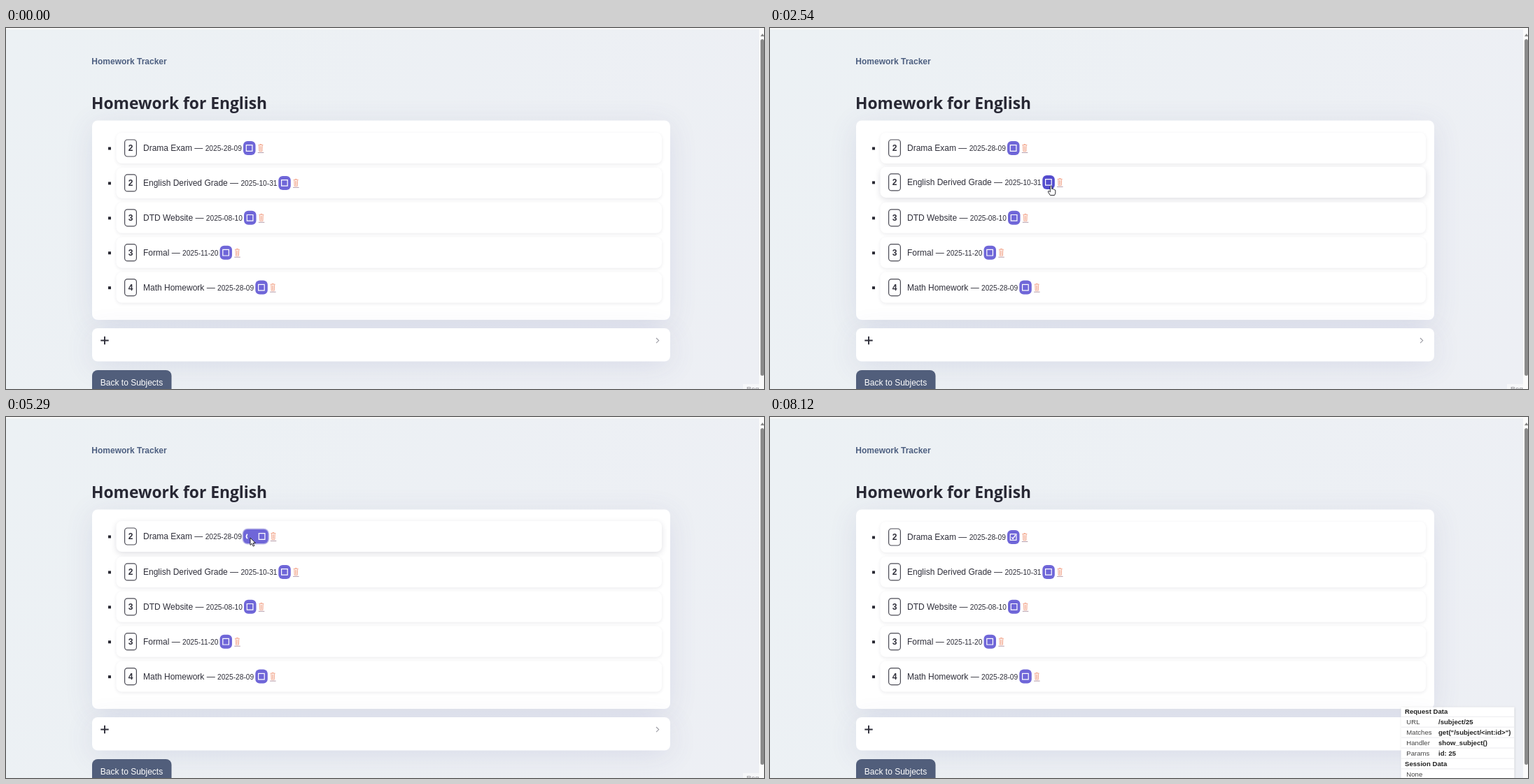
These frames come from a looping animation (1083 px wide and 517 px high, 8.32 s). An HTML page with a canvas:

```html
<!DOCTYPE html>
<html lang="en">
<head>
<meta charset="utf-8">
<title>Homework Tracker</title>
<style>
  html, body { margin: 0; width: 100%; height: 100%; overflow: hidden; background: #edf0f4; }
  canvas { display: block; }
</style>
</head>
<body>
<canvas id="stage" width="1083" height="517"></canvas>
<script>
const ctx = document.getElementById('stage').getContext('2d');
const LOOP = 8320, STEP = LOOP / 125;
const SANS = '"Liberation Sans", Arial, sans-serif';
const INK = '#2f2f3a';

// priority, title, date, left edge of the tick button
const rows = [
  [2, 'Drama Exam', '2025-28-09', 339],
  [2, 'English Derived Grade', '2025-10-31', 389.3],
  [3, 'DTD Website', '2025-08-10', 340],
  [3, 'Formal', '2025-11-20', 305.5],
  [4, 'Math Homework', '2025-28-09', 356.3]
];
const rowY = i => 172 + 49.9 * i;

// pointer tip: time, x, y
const path = [
  [390, 1005, 491], [1200, 372, 143], [1270, 372, 143], [1530, 349, 172],
  [1960, 349, 172], [2500, 401.5, 226], [2900, 401.5, 226], [3610, 351, 275],
  [3943, 351, 275], [4110, 356, 182], [4250, 356, 182], [4500, 349, 173],
  [6050, 349, 173], [6450, 401, 183], [6850, 350, 168],
  [7190, 350, 168], [8050, 1062, 520]
];

const lerp = (a, b, p) => a + (b - a) * p;
const mix = (a, b, p) => `rgb(${a.map((v, i) => Math.round(lerp(v, b[i], p)))})`;

function pointer(t) {
  const q = Math.floor(t / STEP) * STEP;
  const i = path.findIndex(k => k[0] > q);
  if (i === 0) return path[0].slice(1);
  if (i < 0) return path.at(-1).slice(1);
  const [t0, x0, y0] = path[i - 1], [t1, x1, y1] = path[i];
  const p = (q - t0) / (t1 - t0), e = p * p * (3 - 2 * p);
  return [lerp(x0, x1, e), lerp(y0, y1, e)];
}

const isBusy = t => t >= 4850 && t < 5560;
const isLive = t => t >= 390 && !(t >= 5490 && t < 5620);

function overRow(t, i) {
  const [x, y] = pointer(t);
  return isLive(t) && x > 157 && x < 937 && Math.abs(y - rowY(i)) < 22;
}

function overButton(t, i, width = 18) {
  const [x, y] = pointer(t), left = rows[i][3];
  return isLive(t) && !isBusy(t) && x >= left && x <= left + width && Math.abs(y - rowY(i)) < 11;
}

// a linear transition: share of the recent past spent in the state
function eased(test, t, i, span = 150) {
  let n = 0;
  for (let k = 0; k < 10; k++) n += test(t - k * span / 10, i);
  return n / 10;
}

function text(str, x, y, size, color = INK, weight = 400, family = SANS) {
  ctx.font = `${weight} ${size}px ${family}`;
  ctx.fillStyle = color;
  ctx.fillText(str, x, y);
  return x + ctx.measureText(str).width;
}

function box(x, y, w, h, r, fill, stroke, line = 1) {
  ctx.beginPath();
  ctx.roundRect(x, y, w, h, r);
  if (fill) { ctx.fillStyle = fill; ctx.fill(); }
  if (stroke) { ctx.strokeStyle = stroke; ctx.lineWidth = line; ctx.stroke(); }
}

function raised(dy, blur, color, draw) {
  ctx.save();
  Object.assign(ctx, { shadowOffsetY: dy, shadowBlur: blur, shadowColor: color });
  draw();
  ctx.restore();
}

function stroke(d, color, line, x = 0, y = 0) {
  ctx.save();
  ctx.translate(x, y);
  ctx.strokeStyle = color;
  ctx.lineWidth = line;
  ctx.stroke(new Path2D(d));
  ctx.restore();
}

function card(y, h) {
  raised(7, 40, 'rgba(75,75,150,.13)', () => box(123, y, 826, h, 8, '#fff'));
}

function trash(x, y, color) {
  stroke('M0 -4.5H7M2.5 -4.5V-5.5H4.5V-4.5M1 -4.5L1.4 4.5H5.6L6 -4.5M2.7 -3V3.5M4.3 -3V3.5', color, .8, x + .6, y);
  stroke('M0 6.5H8.5', '#b59ba8', 1, x, y);
}

function tickButton(t, i, y) {
  const busy = i === 0 && isBusy(t), x = rows[i][3], w = busy ? 35.5 : 17.5;
  const fill = mix([111, 102, 216], [77, 69, 202], eased(overButton, t, i, 200));
  if (busy) box(x - .5, y - 10.5, w + 1, 21, 7, null, '#b9b5e6', 2);
  box(x, y - 10, w, 20, 6, fill);
  if (busy) {
    const turn = Math.PI + (Math.min(t, 5290) - 5290) / 110;
    ctx.beginPath();
    ctx.arc(x + 8.5, y, 4, turn - .9, turn + .9);
    ctx.strokeStyle = '#fff';
    ctx.lineWidth = 1.8;
    ctx.stroke();
  }
  const left = x + w - 13.2;
  box(left, y - 4.3, 8.6, 8.6, 0, null, '#fff', 1.2);
  if (i === 0 && t >= 5560) stroke('M2 .2L3.8 2.3L7.4 -3', '#fff', 1.4, left, y);
  return x + w;
}

function trashColor(t, i) {
  if (i === 0 && t > 1400 && t < 2010) return '#77688a';
  if (i < 3 && t >= 4010 && t < 4820) return '#d58c9c';
  return '#f2a085';
}

function drawRow(t, i) {
  const [level, title, date] = rows[i], h = eased(overRow, t, i), y = rowY(i) - h;
  raised(1.5 + h, 5 + 3 * h, `rgba(40,40,70,${.09 + .06 * h})`, () => box(157.5, y - 22, 779.5, 44, 8, '#fff'));
  ctx.fillStyle = '#292933';
  ctx.fillRect(146, y - 1.5, 4, 4);
  box(169.6, y - 12, 16.8, 24, 4, '#fff', '#4b4b55', 1.2);
  text(level, 174.7, y + 4.3, 12, INK, 700);
  const end = text(title + ' — ', 196, y + 4, 12);
  text(date, end, y + 4, 10.2);
  trash(tickButton(t, i, y) + 3.3, y, trashColor(t, i));
}

function drawPage(t) {
  const bg = ctx.createLinearGradient(0, 0, 1083, 517);
  bg.addColorStop(0, '#ecf1f4');
  bg.addColorStop(1, '#edeff4');
  ctx.fillStyle = bg;
  ctx.fillRect(0, 0, 1083, 517);
  ctx.fillStyle = '#fafafa';
  ctx.fillRect(0, 0, 1083, 2);

  text('Homework Tracker', 122.3, 52.3, 12, '#4d5f80', 700);
  text('Homework for English', 122, 116, 22.8, '#272733', 700, '"Open Sans", "Noto Sans", sans-serif');
  card(132.5, 285.5);
  card(430, 47.5);
  rows.forEach((_, i) => drawRow(t, i));

  stroke('M135.3 447.5H146.7M141 441.8V453.2', INK, 1.9);
  stroke('M929 444L932.7 447.6L929 451.2', '#9a9aa2', 1.1);
  box(123, 490, 113.5, 40, 8, '#515e7b');
  text('Back to Subjects', 134.8, 512, 12, '#fff');
}

function drawPanel(t) {
  const shown = t < 7970 ? 0 : Math.min(1, (Math.floor((t - 7970) / 70) + 1) / 3);
  if (shown < 1) {
    box(1053, 510, 30, 10, 0, '#f6f7f9');
    text('Req', 1058, 519.5, 9.6, '#a9a9ad', 700);
  }
  if (!shown) return;
  ctx.save();
  ctx.globalAlpha = shown;
  raised(0, 3, 'rgba(0,0,0,.2)', () => box(901.5, 415.5, 162, 110, 0, '#fff'));
  const lines = [
    ['Request Data'], ['URL', '/subject/25'], ['Matches', 'get("/subject/<int:id>")'],
    ['Handler', 'show_subject()'], ['Params', 'id: 25'], ['Session Data'], ['None', '']
  ];
  lines.forEach(([label, value], i) => {
    const y = 425.2 + i * 14.95, head = value === undefined;
    text(label, head ? 907 : 909.3, y, 9.6, head ? '#222' : '#444', head ? 700 : 400);
    if (value) text(value, 955, y, 9.6, '#222', 700);
    stroke('M902 0H1063', '#e6e6ea', .8, 0, y + 4);
  });
  ctx.restore();
}

function drawScrollbar() {
  ctx.fillStyle = '#fbfbfb';
  ctx.fillRect(1076, 0, 7, 517);
  box(1078, 16, 5, 482, 2.5, '#8a8a8a');
  ctx.fillStyle = '#858585';
  ctx.fill(new Path2D('M1078 12L1080.8 8L1083.5 12Z'));
}

const ARROW = new Path2D('M0 0V10.4L2.4 8.2L4.1 12.1L5.8 11.4L4.1 7.6L7.3 7.4Z');
const HAND = new Path2D('M-1.2 .8Q0 -.6 1.2 .8V4.5Q2.5 3.8 3 5Q4.4 4.5 4.8 5.7Q6.3 5.5 6.3 7V10Q6 12 5 13.5H-1.2L-4 9Q-4.6 7.2 -2.8 7.4L-1.2 8.8Z');

function drawPointer(t) {
  if (t < 390 || t >= 8050) return;
  const hand = rows.some((_, i) => overButton(t, i, 30));
  ctx.save();
  ctx.translate(...pointer(t));
  ctx.lineJoin = 'round';
  ctx.lineWidth = .9;
  ctx.fillStyle = '#fff';
  ctx.strokeStyle = '#16161c';
  const shape = hand ? HAND : ARROW;
  ctx.fill(shape);
  ctx.stroke(shape);
  ctx.restore();
}

function frame() {
  const t = performance.now() % LOOP;
  drawPage(t);
  drawPanel(t);
  drawScrollbar();
  drawPointer(t);
  requestAnimationFrame(frame);
}
frame();
</script>
</body>
</html>
```
